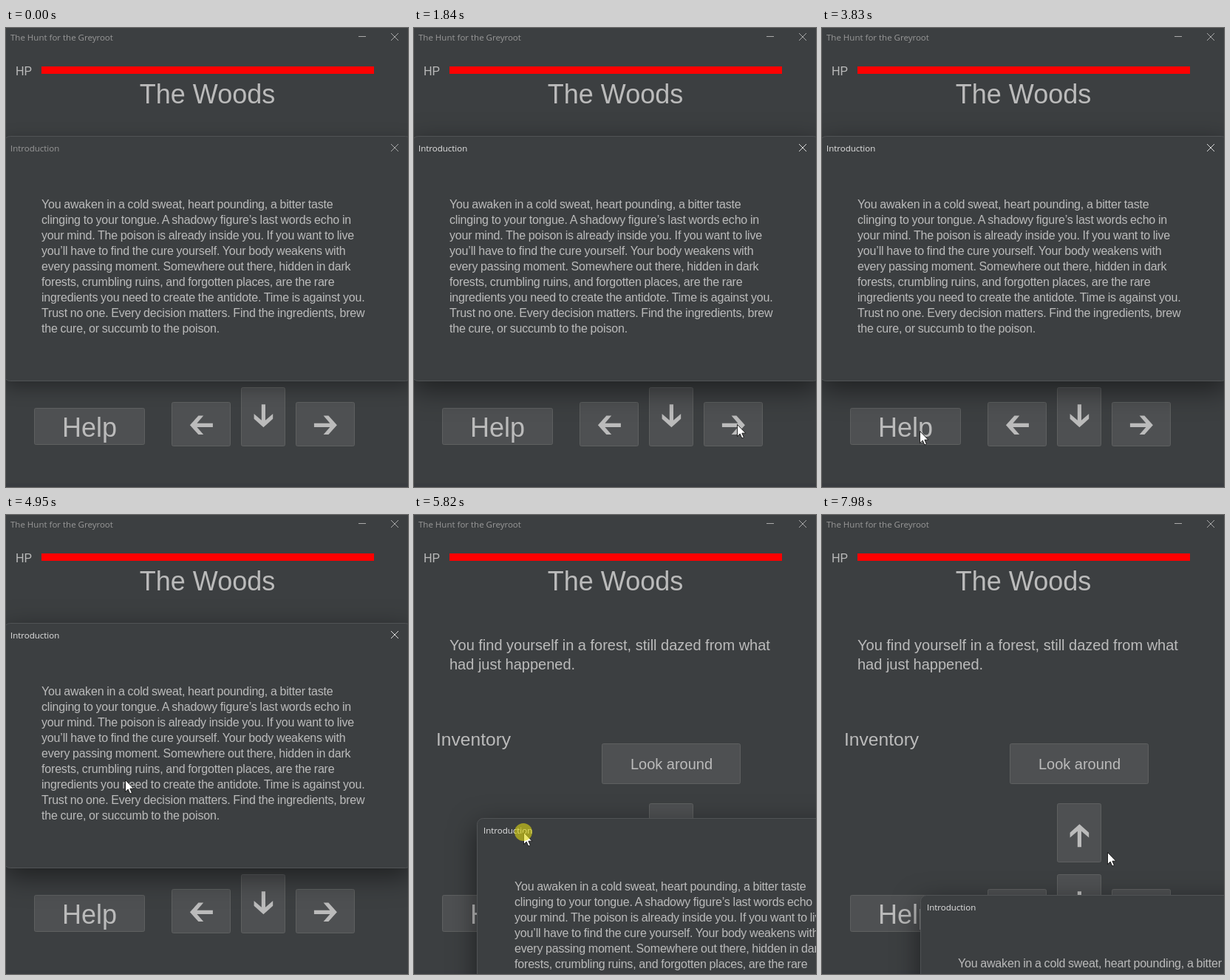
An HTML page for the animation above (8000 ms loop, 544 by 621 pixels).

```html
<!DOCTYPE html>
<html lang="en">
<head>
<meta charset="utf-8">
<style>
  html, body { margin: 0; width: 100%; height: 100%; overflow: hidden; background: #3c3f41; }
  svg { display: block; }
  text { font-family: "Liberation Sans", Arial, sans-serif; fill: #bbb; white-space: pre; }
  .caption { font: 11.5px "Open Sans", "Noto Sans", sans-serif; fill: #999; }
  .icon { fill: none; stroke: #aaa; }
  .button { fill: #4e5052; stroke: #5e6060; }
  .arrow { fill: #bbb; }
  .body { font-size: 16px; letter-spacing: -.18px; word-spacing: -.45px; }
  #dialog > rect { fill: #3c3f41; stroke: #505355; filter: drop-shadow(0 8px 12px rgba(0, 0, 0, .35)); }
  #dialog.active > rect { filter: drop-shadow(0 11px 18px rgba(0, 0, 0, .5)); }
  #dialog.active .caption { fill: #e6e6e6; }
  #dialog.active .icon { stroke: #ddd; }
</style>
</head>
<body>
<svg width="544" height="621" viewBox="0 0 544 621">
  <defs>
    <path id="arrow" d="M-15.5 0 L-4 -12.8 H2.8 L-6 -2.6 H15.5 V2.6 H-6 L2.8 12.8 H-4 Z"/>
  </defs>
  <rect width="544" height="621" fill="#3c3f41"/>
  <rect y="616" width="544" height="5" fill="#393c40"/>
  <text class="caption" x="6" y="17">The Hunt for the Greyroot</text>
  <path class="icon" d="M477 11.5h10M521 7l10 10m0 -10l-10 10"/>
  <text x="13" y="64" font-size="16">HP</text>
  <rect x="48" y="52" width="450" height="10" fill="red"/>
  <text x="272.5" y="102" font-size="36" text-anchor="middle">The Woods</text>
  <text x="48" y="183" font-size="20">You find yourself in a forest, still dazed from what</text>
  <text x="48" y="209" font-size="20">had just happened.</text>
  <text x="30" y="312" font-size="24.6">Inventory</text>
  <rect class="button" x="254.5" y="309.5" width="187" height="54" rx="2"/>
  <text x="348.5" y="344" font-size="20" text-anchor="middle">Look around</text>
  <rect class="button" x="38.5" y="514.5" width="149" height="49" rx="2"/>
  <text x="113" y="553" font-size="36" text-anchor="middle">Help</text>
  <g id="pad"></g>
  <g id="dialog">
    <rect x="-2.5" y="146.5" width="551" height="331" rx="8"/>
    <text class="caption" x="6" y="167">Introduction</text>
    <path class="icon" d="M521 157l10 10m0 -10l-10 10"/>
  </g>
  <g id="pointer">
    <path d="M.5 .5V16.6L4.2 13.1L6.8 19L9.4 17.9L6.9 12.2H11.8Z" fill="#fff" stroke="#111" stroke-width=".9"/>
    <circle id="press" r="12" fill="#e0d810" fill-opacity=".6"/>
  </g>
</svg>
<script>
const $ = id => document.getElementById(id);
const LOOP = 8000, PRESS = 120, ENTER = 260, FOCUS = 1120;

// Left, up, right and down buttons
$("pad").innerHTML = [[264, 536], [348, 430], [432, 536], [348, 526]].map(([x, y], i) => {
  const w = i % 2 ? 60 : 80, h = 140 - w, lift = 1.3 + 2.5 * Math.sin(i * Math.PI / 2);
  return `<rect class="button" x="${x - w / 2 + .5}" y="${y - h / 2 + .5}" width="${w - 1}" height="${h - 1}" rx="2"/>
    <use href="#arrow" class="arrow" transform="translate(${x + .4} ${y + lift}) rotate(${90 * i})"/>`;
}).join("");

const story = `You awaken in a cold sweat, heart pounding, a bitter taste
clinging to your tongue. A shadowy figure’s last words echo in
your mind. The poison is already inside you. If you want to live
you’ll have to find the cure yourself. Your body weakens with
every passing moment. Somewhere out there, hidden in dark
forests, crumbling ruins, and forgotten places, are the rare
ingredients you need to create the antidote. Time is against you.
Trust no one. Every decision matters. Find the ingredients, brew
the cure, or succumb to the poison.`;
$("dialog").insertAdjacentHTML("beforeend", story.split("\n").map((line, i) =>
  `<text class="body" x="48" y="${244 + 21 * i}">${line}</text>`).join(""));

// Pointer stops: time, x, y
const grab = [5590, 60, 165], drop = [6380, 196, 533];
const stops = [[0, 463, 622], [ENTER, 463, 622], [1000, 352, 529], [FOCUS, 352, 529],
  [1920, 439, 536], [2620, 375, 537], [4120, 112, 546], [4950, 161, 358], [5240, 102, 222],
  grab, [5820, 148, 429], drop, [6600, 332, 414], [7250, 339, 420], [LOOP, 386, 456]];
const clicks = [FOCUS, 1920, 4120, 6600];

// Smooth path through the stops, without overshoot
function pointerAt(t) {
  const i = Math.max(1, stops.findIndex(s => s[0] > t));
  const a = stops[i - 1], b = stops[i], span = b[0] - a[0], u = (t - a[0]) / span;
  const slope = (j, c) => {
    const p = stops[j - 1], s = stops[j], n = stops[j + 1];
    if (!p || !n) return 0;
    const l = (s[c] - p[c]) / (s[0] - p[0]), r = (n[c] - s[c]) / (n[0] - s[0]);
    return l * r > 0 ? 2 * l * r / (l + r) : 0;
  };
  return [1, 2].map(c => Math.round(
    a[c] + (b[c] - a[c]) * u * u * (3 - 2 * u) +
    span * u * (1 - u) * ((1 - u) * slope(i - 1, c) - u * slope(i, c))));
}

function draw(now) {
  const t = now % LOOP;
  const dragging = t >= grab[0] && t < drop[0];
  const clicking = clicks.some(c => t >= c && t < c + PRESS);
  const [dx, dy] = pointerAt(Math.min(Math.max(t, grab[0]), drop[0]));

  $("pointer").setAttribute("transform", `translate(${pointerAt(t)})`);
  $("pointer").style.display = t < ENTER ? "none" : "";
  $("press").style.display = dragging || clicking ? "" : "none";
  $("dialog").setAttribute("transform", `translate(${dx - grab[1]} ${dy - grab[2]})`);
  $("dialog").classList.toggle("active", t >= FOCUS);
  requestAnimationFrame(draw);
}
requestAnimationFrame(draw);
</script>
</body>
</html>
```
